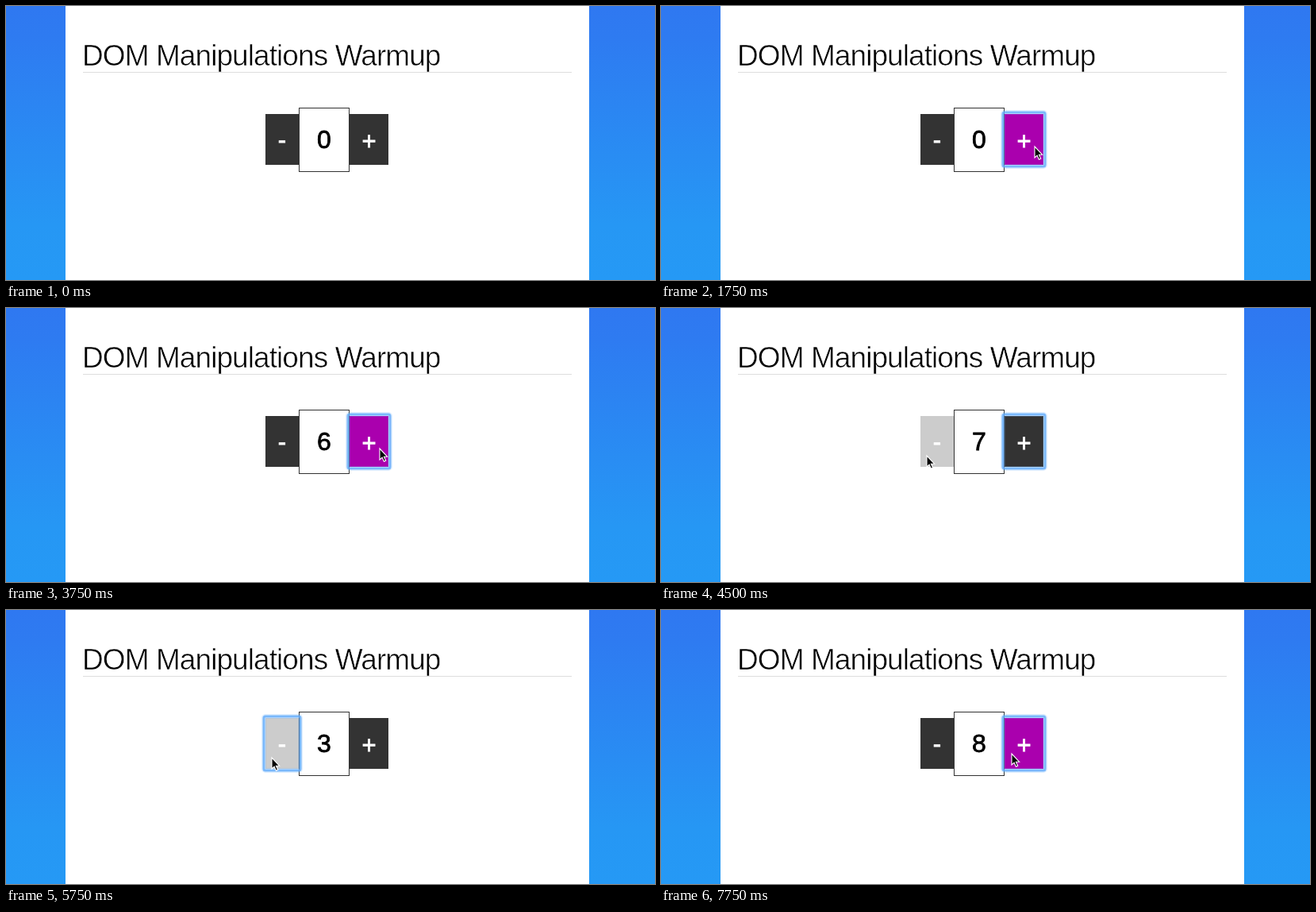
An HTML page for the animation above (8 s loop, 818x345 px).

```html
<!DOCTYPE html>
<html lang="en">
<head>
<meta charset="utf-8">
<title>Counter</title>
<style>
  html, body { margin: 0; width: 100%; height: 100%; overflow: hidden; }
  svg { display: block; width: 818px; height: 345px; }
  text { font-family: "Liberation Sans", Arial, sans-serif; }
  .title { font-size: 37px; letter-spacing: -.92px; stroke: #fff; stroke-width: .6px; }
  .sign { font-size: 31px; fill: #fff; stroke: #fff; stroke-width: .8px; text-anchor: middle; }
  .count { font-size: 32px; stroke: #000; stroke-width: .8px; text-anchor: middle; }
</style>
</head>
<body>
<svg viewBox="0 0 818 345">
  <defs>
    <linearGradient id="sky" x1="0" y1="0" x2="0" y2="1">
      <stop offset="0" stop-color="#2f78f1"/>
      <stop offset=".12" stop-color="#2e7bf1"/>
      <stop offset=".8" stop-color="#2697f4"/>
      <stop offset="1" stop-color="#2599f5"/>
    </linearGradient>
  </defs>
  <rect width="818" height="345" fill="url(#sky)"/>
  <rect x="75" width="660" height="345" fill="#fff"/>
  <text class="title" x="96" y="75.3">DOM Manipulations Warmup</text>
  <rect x="97" y="83" width="616" height="1" fill="#ddd"/>

  <rect id="minus" x="327" y="136" width="42" height="64"/>
  <rect id="plus" x="433" y="136" width="49" height="64"/>
  <text class="sign" x="348" y="179">-</text>
  <text class="sign" x="457.5" y="181">+</text>
  <rect x="369.5" y="128.5" width="63" height="80" fill="#fff" stroke="#333"/>
  <text id="count" class="count" x="401" y="179"></text>

  <g id="ring" fill="none" stroke="#62acfb">
    <rect y="134" height="68" rx="2" stroke-width="6" stroke-opacity=".2"/>
    <rect y="134" height="68" rx="2" stroke-width="3" stroke-opacity=".8"/>
  </g>
  <path id="cursor" d="M1 1V15L4.1 12.1 6.4 17.3 8.7 16.3 6.4 11.2H10.6Z"
        stroke="#fff" stroke-width="1.1"/>
</svg>
<script>
const LOOP = 8000, STEP = 250, CLICK = 210, HOVER_FROM = 1500;
const $ = id => document.getElementById(id);

const buttons = {
  minus: { x: 327, w: 42, sign: -1 },
  plus: { x: 433, w: 49, sign: 1 }
};

// runs of evenly spaced clicks
const run = (name, start, n) => ({ name, start, n, end: start + n * CLICK });
const runs = [
  run("plus", 1600, 4),
  run("plus", 2780, 1),
  run("plus", 3280, 1),
  run("plus", 3700, 1),
  run("minus", 4700, 4),
  run("plus", 6700, 5)
];

// pointer stops, joined by eased moves that sag by "bend"
const enter = { x: 543, y: 127 }, right = { x: 470, y: 176 },
      left = { x: 334, y: 185 }, back = { x: 441, y: 180 };
const moves = [
  { start: 500, end: 1000, from: enter, to: right, bend: 8 },
  { start: 4000, end: 4500, from: right, to: left, bend: 50 },
  { start: 5750, end: 6500, from: left, to: back, bend: 0 }
];

const clamp = (v, lo, hi) => Math.min(hi, Math.max(lo, v));
const mix = (a, b, k) => a + (b - a) * k;

function pointer(t) {
  const m = moves.findLast(m => t >= m.start);
  if (!m) return null;
  const p = clamp((t - m.start) / (m.end - m.start), 0, 1);
  const k = p * p * (3 - 2 * p);
  return {
    x: mix(m.from.x, m.to.x, k),
    y: mix(m.from.y, m.to.y, k) + m.bend * Math.sin(Math.PI * k)
  };
}

function counter(t) {
  return runs.reduce((sum, r) =>
    sum + buttons[r.name].sign * clamp(Math.floor((t - r.start) / CLICK), 0, r.n), 0);
}

function draw(time) {
  const t = Math.floor(time % LOOP / STEP) * STEP;
  const tip = pointer(t);
  const last = runs.findLast(r => t >= r.start);
  // within a run the button is seen down on every other step
  const down = last && t <= last.end && t / STEP % 2 === 1;

  for (const [name, b] of Object.entries(buttons)) {
    const over = t >= HOVER_FROM && tip.x >= b.x && tip.x < b.x + b.w && tip.y < 200;
    $(name).setAttribute("fill", !over ? "#333" : down ? "#aa00ae" : "#ccc");
  }

  $("count").textContent = counter(t);
  $("cursor").style.display = tip ? "" : "none";
  if (tip) $("cursor").setAttribute("transform", `translate(${tip.x} ${tip.y})`);

  $("ring").style.display = last ? "" : "none";
  if (last) {
    const { x, w } = buttons[last.name];
    for (const r of $("ring").children) {
      r.setAttribute("x", x - 2);
      r.setAttribute("width", w + 4);
    }
  }
}

let start;
function tick(now) {
  start ??= now;
  draw(now - start);
  requestAnimationFrame(tick);
}
draw(0);
requestAnimationFrame(tick);
</script>
</body>
</html>
```
